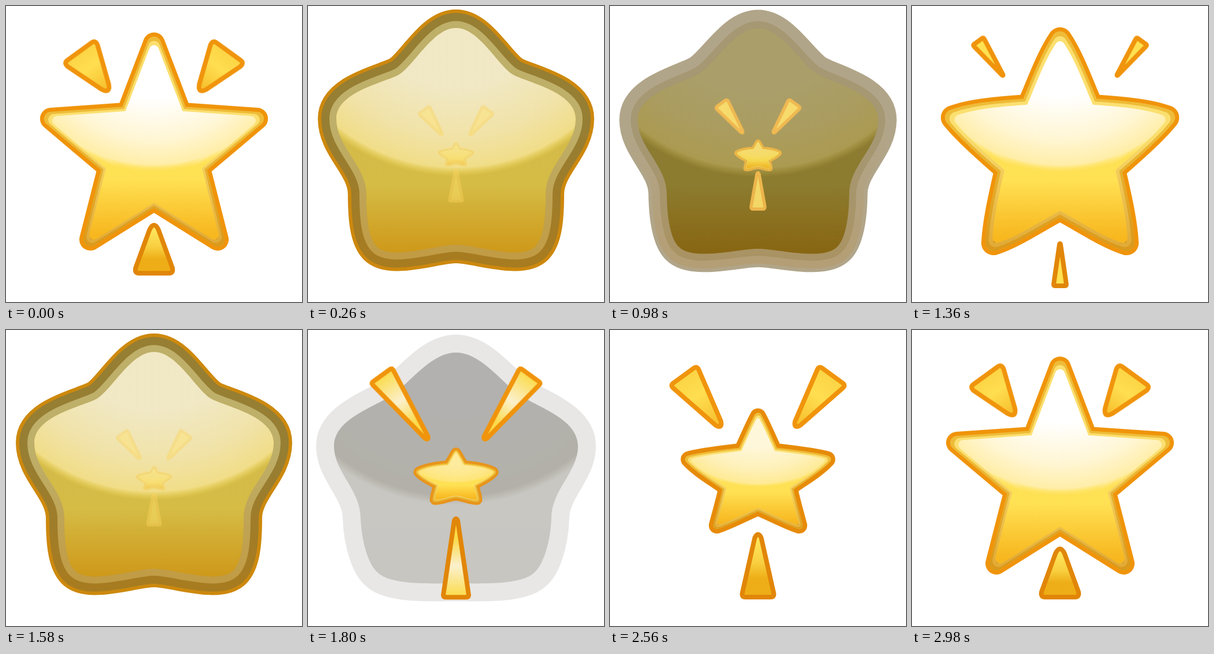
These frames come from a looping animation (512x512 px, 3000 ms). An HTML page without scripts:

```html
<!DOCTYPE html>
<html lang="en">
<head>
<meta charset="utf-8">
<title>Glowing star</title>
<style>
/* band radii, inset scale */
@property --a { syntax: "<length>"; inherits: true; initial-value: 19px }
@property --b { syntax: "<length>"; inherits: true; initial-value: 12px }
@property --c { syntax: "<length>"; inherits: true; initial-value: 10.5px }
@property --e { syntax: "<length>"; inherits: true; initial-value: 9px }
@property --k { syntax: "<number>"; inherits: true; initial-value: .97 }
/* band colours */
@property --rim { syntax: "<color>"; inherits: true; initial-value: #f0940a }
@property --mid { syntax: "<color>"; inherits: true; initial-value: #eebc38 }
@property --in { syntax: "<color>"; inherits: true; initial-value: #fbdf70 }
/* layer strengths */
@property --film { syntax: "<number>"; inherits: true; initial-value: 1 }
@property --band { syntax: "<number>"; inherits: true; initial-value: 1 }
@property --skin { syntax: "<number>"; inherits: true; initial-value: 1 }
@property --dim { syntax: "<number>"; inherits: true; initial-value: 1 }
@property --lit { syntax: "<number>"; inherits: true; initial-value: 1 }

:root {
  --small: path("M0-43C4-37 9-27 13-21C27-20 52-17 64-10C57-1 40 6 30 12C32 19 36 31 36 37C27 38 11 30 0 30C-11 30-27 38-36 37C-36 31-32 19-30 12C-40 6-57-1-64-10C-52-17-27-20-13-21C-9-27-4-37 0-43Z");
  --half: path("M0-91C9-77 18-55 25-42C55-38 92-34 109-27C95-10 65 5 50 16C54 35 60 55 64 70C45 66 22 54 0 46C-22 54-45 66-64 70C-60 55-54 35-50 16C-65 5-95-10-109-27C-92-34-55-38-25-42C-18-55-9-77 0-91Z");
  --rest: path("M0-191C15-151 31-110 46-70C90-67 134-64 178-61C145-33 111-5 78 23C89 65 99 106 110 148C73 125 37 102 0 79C-37 102-73 125-110 148C-99 106-89 65-78 23C-111-5-145-33-178-61C-134-64-90-67-46-70C-31-110-15-151 0-191Z");
  --wide: path("M0-198C22-165 38-118 54-82C95-79 150-76 185-63C163-36 122 0 92 26C101 66 113 115 115 154C82 144 36 113 0 94C-36 113-82 144-115 154C-113 115-101 66-92 26C-122 0-163-36-185-63C-150-76-95-79-54-82C-38-118-22-165 0-198Z");
  --big: path("M0-218C40-218 72-153 99-137C122-124 207-108 207-61C207-12 155 20 155 69C155 110 152 145 137 160C112 185 35 157 0 157C-35 157-112 185-137 160C-152 145-155 110-155 69C-155 20-207-12-207-61C-207-108-122-124-99-137C-72-153-40-218 0-218Z");
  --end: path("M0-217C40-217 74-172 104-148C134-124 211-105 211-55C211-10 165 20 165 70C163 115 150 150 137 162C115 187 35 182 0 182C-35 182-115 187-137 162C-150 150-163 115-165 70C-165 20-211-10-211-55C-211-105-134-124-104-148C-74-172-40-217 0-217Z");
  --ray0: path("M0 0Q0 0 0 0L0 30Q0 30 0 30H0Q0 30 0 30Z");
  --ray1: path("M-2 31Q0 26 2 31L11 78Q11 81 9 81H-9Q-11 81-11 78Z");
  --ray2: path("M-2 35Q0 30 2 35L12 91Q12 95 9 95H-9Q-12 95-12 91Z");
  --ray3: path("M-3 73Q0 67 3 73L22 202Q22 206 18 206H-18Q-22 206-22 202Z");
  --ray4: path("M-2 109Q0 105 2 109L17 212Q17 216 13 216H-13Q-17 216-17 212Z");
  --ray5: path("M-1 156Q0 153 1 156L11 225Q11 228 9 228H-9Q-11 228-11 225Z");
  --ray6: path("M0 243Q0 243 0 243L2 244Q2 244 1 244H-1Q-2 244-2 244Z");
  --rayrest: path("M-8 131Q0 114 8 131L32 197Q34 206 26 206H-26Q-34 206-32 197Z");
}

html, body { margin: 0; width: 100%; height: 100%; overflow: hidden; background: #fff }
svg { display: block; width: 100vw; height: 100vh }

.star, .body, .star path { animation: 3s linear var(--t) infinite both }
.l1 { fill: var(--rim); stroke: var(--rim); stroke-width: calc(2 * var(--a)); opacity: var(--film) }
.l2 { fill: var(--mid); stroke: var(--mid); stroke-width: calc(2 * var(--b)); opacity: var(--band) }
.l3 { fill: var(--in); stroke: var(--in); stroke-width: calc(2 * var(--c)); opacity: var(--band); transform: scale(var(--k)) }
.dusk { fill: url(#dusk); stroke: url(#dusk); stroke-width: calc(2 * var(--b)); opacity: calc(var(--lit) * var(--band)) }
.core { fill: url(#core); stroke: url(#core); opacity: var(--skin); filter: brightness(var(--dim)) }
.gloss { fill: url(#gloss); stroke: url(#gloss); opacity: var(--lit) }
.core, .gloss { stroke-width: calc(2 * var(--e)); transform: scale(calc(var(--k) * var(--k))) }
path { stroke-linejoin: round }
.ray { --edge: #f0940c; fill: url(#amber); stroke: var(--edge) }
.low { --edge: #e18608 }
.land .low, .out .low { fill: url(#deep) }

.star.go { animation-name: go }
.go .body { animation-name: go-body }
.go .body path { animation-name: go-shape }
.go .ray { animation-name: go-ray }
.star.land { animation-name: land }
.land .body { animation-name: land-body }
.land .body path { animation-name: land-shape }
.land .ray { animation-name: land-ray }
.star.out { animation-name: out }
.out .body { animation-name: out-body }
.out .body path { animation-name: out-shape }
.out .ray { animation-name: out-ray }

/* full life: emerge, swell, burst, fade */
@keyframes go {
  0% { opacity: 0; --lit: .1; --rim: #fbd35c }
  2% { opacity: .45; --rim: #fbd35c }
  4% { opacity: .9; --lit: .15; --rim: #f4b848 }
  9.333% { opacity: 1; --lit: .4; --rim: #e8941a }
  12% { --lit: .75; --rim: #e68a08 }
  16.667% { --lit: 1; --rim: #f0940a }
  22% { opacity: 1; --rim: #f0940a; --mid: #eebc38; --in: #fbdf70; --film: 1; --band: 1; --skin: 1; --dim: 1; --lit: 1 }
  24% { --rim: #cd880b; --mid: #967d32; --in: #beaf69; --film: 1; --band: 1; --dim: .84; --lit: .68 }
  26% { opacity: 1; filter: brightness(1); --rim: #b2a68a; --mid: #b2a68a; --in: #a59873; --film: 1; --band: 1; --skin: 1; --dim: .55; --lit: .27 }
  31.333% { opacity: .6; filter: brightness(.3); --film: .2; --band: 0; --skin: .3; --lit: .45 }
  33%, 100% { opacity: 0; filter: brightness(.3); --rim: #b2a68a; --mid: #b2a68a; --in: #a59873; --film: .2; --band: 0; --skin: .3; --dim: .55; --lit: .45 }
}
@keyframes go-body {
  0% { transform: translateY(1px) scale(.2); --a: 9px; --b: 4.5px; --c: 3px; --e: 2px; --k: .97 }
  2% { transform: translateY(2px) scale(.43) }
  4% { transform: translateY(4px) scale(.56); animation-timing-function: cubic-bezier(.4,.2,.8,.6) }
  9.333% { transform: none; --a: 9px; --b: 4.5px; --c: 3px; --e: 2px }
  12% { --a: 13px; --b: 5.5px; --c: 4px; --e: 2.5px }
  16.667% { --a: 21px; --b: 14px; --c: 12px; --e: 9px; --k: .97 }
  24% { --a: 32px; --b: 26px; --c: 12px; --e: 0px; --k: 1 }
  31.333%, 100% { transform: none; --a: 31px; --b: 24px; --c: 12px; --e: 0px; --k: 1 }
}
@keyframes go-shape {
  0%, 9.333% { d: var(--small) }
  12% { d: var(--half) }
  16.667% { d: var(--wide) }
  24% { d: var(--big) }
  31.333%, 100% { d: var(--end) }
}
@keyframes go-ray {
  0% { d: var(--ray0); stroke-width: 2px; stroke: #fbd35c; fill: #ffe26e }
  2% { d: var(--ray1); stroke-width: 5px; stroke: #fbd35c }
  4% { d: var(--ray2); stroke-width: 5.5px; stroke: #f8bd50; fill: #ffe26e; animation-timing-function: cubic-bezier(.4,.2,.8,.6) }
  9.333% { d: var(--ray3); stroke-width: 8px; stroke: var(--edge); fill: url(#shine) }
  12% { d: var(--ray4); stroke-width: 8px; fill: url(#shine) }
  16.667% { d: var(--ray5); stroke-width: 8px; fill: #ffe152 }
  22.6% { d: var(--ray6); stroke-width: 4px; opacity: 1 }
  23.4%, 100% { d: var(--ray6); stroke-width: 0px; stroke: var(--edge); fill: #ffe152; opacity: 0 }
}

/* last birth, settling into the resting pose */
@keyframes land {
  0% { opacity: 0; --lit: .1; --rim: #fbd35c }
  2% { opacity: .45; --rim: #fbd35c }
  4% { opacity: .9; --lit: .15; --rim: #f4b848 }
  9.333% { opacity: 1; --lit: .4; --rim: #e8941a }
  12% { --lit: .75; --rim: #e68a08 }
  20% { --lit: 1; --rim: #f0940a }
  27.333% { opacity: 1 }
  27.334%, 100% { opacity: 0; --lit: 1; --rim: #f0940a }
}
@keyframes land-body {
  0% { transform: translateY(1px) scale(.2); --a: 9px; --b: 4.5px; --c: 3px; --e: 2px }
  2% { transform: translateY(2px) scale(.43) }
  4% { transform: translateY(4px) scale(.56); animation-timing-function: cubic-bezier(.4,.2,.8,.6) }
  9.333% { transform: none; --a: 9px; --b: 4.5px; --c: 3px; --e: 2px }
  12% { --a: 13px; --b: 5.5px; --c: 4px; --e: 2.5px; animation-timing-function: cubic-bezier(.2,.6,.4,1) }
  25%, 100% { transform: none; --a: 19px; --b: 12px; --c: 10.5px; --e: 9px }
}
@keyframes land-shape {
  0%, 9.333% { d: var(--small) }
  12% { d: var(--half); animation-timing-function: cubic-bezier(.2,.6,.4,1) }
  25%, 100% { d: var(--rest) }
}
@keyframes land-ray {
  0% { d: var(--ray0); stroke-width: 2px; stroke: #fbd35c }
  2% { d: var(--ray1); stroke-width: 5px; stroke: #fbd35c }
  4% { d: var(--ray2); stroke-width: 5.5px; stroke: #f8bd50; animation-timing-function: cubic-bezier(.4,.2,.8,.6) }
  9.333% { d: var(--ray3); stroke-width: 8px; stroke: var(--edge); animation-timing-function: cubic-bezier(.2,.6,.4,1) }
  25%, 100% { d: var(--rayrest); stroke-width: 8px; stroke: var(--edge) }
}

/* first burst, leaving the resting pose */
@keyframes out {
  0%, 6.667% { opacity: 1; --rim: #f0940a; --mid: #eebc38; --in: #fbdf70; --film: 1; --band: 1; --skin: 1; --dim: 1; --lit: 1 }
  8.667% { --rim: #cd880b; --mid: #967d32; --in: #beaf69; --film: 1; --band: 1; --dim: .84; --lit: .68 }
  10.667% { opacity: 1; filter: brightness(1); --rim: #b2a68a; --mid: #b2a68a; --in: #a59873; --film: 1; --band: 1; --skin: 1; --dim: .55; --lit: .27 }
  16% { opacity: .6; filter: brightness(.3); --film: .2; --band: 0; --skin: .3; --lit: .45 }
  17.667%, 100% { opacity: 0; filter: brightness(.3); --rim: #b2a68a; --mid: #b2a68a; --in: #a59873; --film: .2; --band: 0; --skin: .3; --dim: .55; --lit: .45 }
}
@keyframes out-body {
  0% { --a: 19px; --b: 12px; --c: 10.5px; --e: 9px; --k: .97 }
  8.667% { --a: 32px; --b: 26px; --c: 12px; --e: 0px; --k: 1 }
  16%, 100% { --a: 31px; --b: 24px; --c: 12px; --e: 0px; --k: 1 }
}
@keyframes out-shape {
  0% { d: var(--rest) }
  8.667% { d: var(--big) }
  16%, 100% { d: var(--end) }
}
@keyframes out-ray {
  0% { d: var(--rayrest); stroke-width: 8px }
  7% { d: var(--ray6); stroke-width: 3px; opacity: 1 }
  7.667%, 100% { d: var(--ray6); stroke-width: 0px; opacity: 0 }
}
</style>
</head>
<body>
<svg viewBox="-256 -256 512 512">
  <defs>
    <linearGradient id="core" x2="0" y2="1">
      <stop offset=".3" stop-color="#fddf5c"/>
      <stop offset=".7" stop-color="#ffe153"/>
      <stop offset=".85" stop-color="#fbcb38"/>
      <stop offset="1" stop-color="#f7b71f"/>
    </linearGradient>
    <linearGradient id="dusk" x2="0" y2="1">
      <stop offset=".45" stop-color="#c87800" stop-opacity="0"/>
      <stop offset="1" stop-color="#c87800" stop-opacity=".5"/>
    </linearGradient>
    <radialGradient id="gloss" cx=".5" cy="-.14" r=".8">
      <stop offset=".5" stop-color="#fff"/>
      <stop offset=".78" stop-color="#fff6d4"/>
      <stop offset=".95" stop-color="#ffeea8"/>
      <stop offset="1" stop-color="#ffe460" stop-opacity="0"/>
    </radialGradient>
    <linearGradient id="shine" x2="0" y2="1">
      <stop offset=".25" stop-color="#fbda48"/>
      <stop offset=".6" stop-color="#fbf0cc"/>
      <stop offset="1" stop-color="#fbdb48"/>
    </linearGradient>
    <linearGradient id="amber" x2="0" y2="1">
      <stop offset="0" stop-color="#f5bd2a"/>
      <stop offset=".6" stop-color="#ffde50"/>
      <stop offset="1" stop-color="#fbd444"/>
    </linearGradient>
    <linearGradient id="deep" x2="0" y2="1">
      <stop offset=".1" stop-color="#ffe55c"/>
      <stop offset=".45" stop-color="#f8cf40"/>
      <stop offset=".7" stop-color="#eeae18"/>
      <stop offset="1" stop-color="#eead16"/>
    </linearGradient>
  </defs>

  <g class="star out" style="--t:0s">
    <g class="body"><path class="l1"/><path class="l2"/><path class="l3"/><path class="dusk"/><path class="core"/><path class="gloss"/></g>
    <path class="ray low"/>
    <path class="ray" transform="rotate(144) translate(0 13)"/>
    <path class="ray" transform="rotate(-144) translate(0 13)"/>
  </g>
  <g class="star go" style="--t:.2s">
    <g class="body"><path class="l1"/><path class="l2"/><path class="l3"/><path class="dusk"/><path class="core"/><path class="gloss"/></g>
    <path class="ray low"/>
    <path class="ray" transform="rotate(144) translate(0 13)"/>
    <path class="ray" transform="rotate(-144) translate(0 13)"/>
  </g>
  <g class="star go" style="--t:.86s">
    <g class="body"><path class="l1"/><path class="l2"/><path class="l3"/><path class="dusk"/><path class="core"/><path class="gloss"/></g>
    <path class="ray low"/>
    <path class="ray" transform="rotate(144) translate(0 13)"/>
    <path class="ray" transform="rotate(-144) translate(0 13)"/>
  </g>
  <g class="star go" style="--t:1.52s">
    <g class="body"><path class="l1"/><path class="l2"/><path class="l3"/><path class="dusk"/><path class="core"/><path class="gloss"/></g>
    <path class="ray low"/>
    <path class="ray" transform="rotate(144) translate(0 13)"/>
    <path class="ray" transform="rotate(-144) translate(0 13)"/>
  </g>
  <g class="star land" style="--t:2.18s">
    <g class="body"><path class="l1"/><path class="l2"/><path class="l3"/><path class="dusk"/><path class="core"/><path class="gloss"/></g>
    <path class="ray low"/>
    <path class="ray" transform="rotate(144) translate(0 13)"/>
    <path class="ray" transform="rotate(-144) translate(0 13)"/>
  </g>
</svg>
</body>
</html>
```
